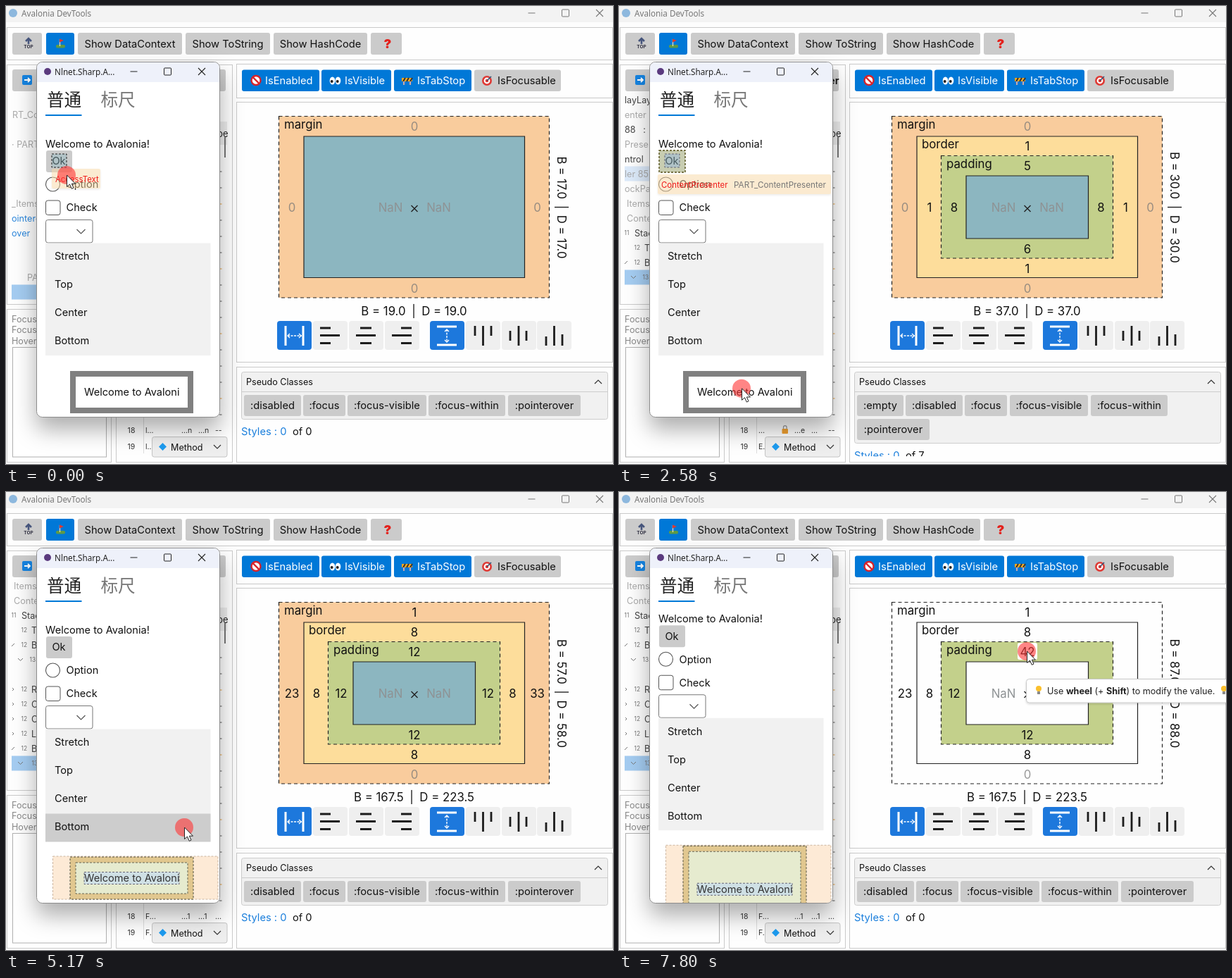
An HTML page for the animation above (8000 ms loop, 862 by 650 pixels).

```html
<!DOCTYPE html>
<html lang="en">
<head>
<meta charset="utf-8">
<title>DevTools layout inspector</title>
<style>
html, body { margin: 0; width: 100%; height: 100%; overflow: hidden; background: #fdfdfd; }
svg { display: block; font-family: Inter, "Noto Sans", sans-serif; }
.ui { font-family: "Noto Sans", sans-serif; }
.cjk { font-family: "Noto Sans CJK SC Light", "Noto Sans CJK SC", "Noto Sans CJK", sans-serif; font-weight: 300; }
</style>
</head>
<body>
<svg id="stage" width="862" height="650" viewBox="0 0 862 650"></svg>
<script>
const LOOP = 8000;
const BLUE = '#0078d7', GRAY = '#cbcbcb', INK = '#111';
const FILL = { margin: '#f9cc9d', border: '#fddd9b', padding: '#c3d08b', content: '#8cb6c0' };
const stage = document.getElementById('stage');

// ---------- drawing helpers: text is placed by its vertical middle ----------
const T = (x, y, s, size = 14.6, fill = INK, more = '') =>
  `<text x="${x}" y="${y + size * .364}" font-size="${size}" fill="${fill}" ${more}>${s}</text>`;
const MID = 'text-anchor="middle"';
const R = (x1, y1, x2, y2, fill, more = '') =>
  `<rect x="${x1}" y="${y1}" width="${x2 - x1}" height="${y2 - y1}" fill="${fill}" ${more}/>`;
const P = (d, stroke = INK, w = 1, more = '') =>
  `<path d="${d}" fill="none" stroke="${stroke}" stroke-width="${w}" ${more}/>`;
const C = (x, y, r, fill, more = '') => `<circle cx="${x}" cy="${y}" r="${r}" fill="${fill}" ${more}/>`;
const panel = (x1, y1, x2, y2) => R(x1 + .5, y1 + .5, x2 + .5, y2 + .5, '#fefefe', 'stroke="#cacaca"');
const button = (x1, y1, x2, y2, on) => R(x1, y1, x2, y2, on ? BLUE : GRAY, 'rx="3"');
const loopPath = ([a, b, c, d]) => `M${a} ${b}H${c}V${d}H${a}Z`;
const ring = (outer, inner, fill, more = '') =>
  `<path d="${loopPath(outer)}${inner ? loopPath(inner) : ''}" fill="${fill}" fill-rule="evenodd" ${more}/>`;
const inside = ([a, b, c, d], p) => p.x >= a && p.x <= c && p.y >= b && p.y <= d;
const bulb = (x, y) => C(x, y - 2, 4, '#fbc02d') + R(x - 2, y + 2, x + 2, y + 6, '#8a8a8a');

// ---------- static parts ----------
function windowButtons(xs, y, h, color) {
  const [a, b, c] = xs;
  return P(`M${a - h} ${y}h${2 * h}M${c - h} ${y - h}l${2 * h} ${2 * h}m0 ${-2 * h}l${-2 * h} ${2 * h}`, color, 1.1) +
    R(b - h, y - h, b + h, y + h, 'none', `stroke="${color}" rx="1"`);
}

function toolbar() {
  const labels = [[102, 250, 'Show DataContext'], [255, 375, 'Show ToString'], [380, 513, 'Show HashCode']];
  return panel(1, 30, 861, 76) +
    button(9, 38, 51, 69) + P('M32 54V48M28 50l4-4 4 4', '#46557c', 2.6) +
    T(32, 58, 'TOP', 6.5, '#334', `${MID} font-weight="700"`) +
    button(57, 38, 97, 69, true) + R(71, 55, 84, 59.5, '#5f9a45', 'rx="2"') +
    P('M76.500 47V57', '#e8dcc0', 1.3) + '<path d="M76 46.500l6 2.500-6 2.500Z" fill="#e5372c"/>' +
    labels.map(([a, b, s]) => button(a, 38, b, 69) + T((a + b) / 2, 53.5, s, 14.7, INK, MID)).join('') +
    button(518, 38, 562, 69) + T(542, 53.5, '?', 18, '#e3211c', `${MID} font-weight="900"`);
}

function flags() {
  const items = [[335, 445, 'IsEnabled'], [448, 547, 'IsVisible'], [551, 661, 'IsTabStop'], [665, 788, 'IsFocusable']];
  return panel(327, 82, 861, 130) +
    items.map(([a, b, s], i) => button(a, 90.5, b, 121, i < 3) + T(a + 33, 105.5, s, 14.7, i < 3 ? '#fff' : INK)).join('') +
    C(355, 105.5, 6.5, '#fff', 'stroke="#d8232a" stroke-width="2.4"') + P('M350.5 101l9 9', '#d8232a', 2.4) +
    [463.5, 471.5].map(x => `<ellipse cx="${x}" cy="106" rx="3.800" ry="5.500" fill="#fff"/>` + C(x - .8, 107, 2, '#222')).join('') +
    R(562, 102, 577, 107, '#f6a821') + P('M564 107l3-5M569 107l3-5M574 107l3-5', '#333', 2) + P('M565 107v5M574 107v5', '#caa', 2) +
    C(683, 106, 7, '#df3a35') + C(683, 106, 4.4, '#fff') + C(683, 106, 2.3, '#df3a35') + P('M683 106l6-6', '#357', 1.6);
}

function alignButtons() {
  const cells = [385, 436, 487, 538, 602, 653, 704, 754];
  const hLines = 'M446 457h15M446 467.5h28M446 478.5h15M503 457h16M497 467.5h28M503 478.5h16M561 457h15M548 467.5h28M561 478.5h15';
  const vLines = 'M666 454v14M677.500 454v28M689 454v14M716 461v14M728 454v28M739 461v14M767 469v13M778.500 454v28M790 466v16';
  return cells.map((x, i) => R(x, 447, x + 49, 488, i % 4 ? '#efefef' : '#1d78dc', 'rx="4"')).join('') +
    P(hLines + vLines, '#1c1c1c', 2.8) +
    P('M397 454v28M422 454v28M612 455h28M612 481h28', '#fff', 3) +
    P('M400 468h20M626 459v18', '#fff', 1.4, 'stroke-dasharray="3 1.500"') +
    P('M403 465l-3 3 3 3M416 465l3 3-3 3M623 462l3-3 3 3M623 474l3 3 3-3', '#fff', 1.3);
}

function leftPanels() {
  const ticks = Array.from({ length: 16 }, (_, i) => Math.round(234.5 + i * 23));
  return panel(1, 83, 149, 423) + button(9, 90, 60, 121) + R(23, 98, 37, 112, '#1583e0', 'rx="2"') +
    P('M26 105h8M31 102l3 3-3 3', '#fff', 1.8) +
    panel(1, 430, 149, 647) +
    ['Focus', 'Focus', 'Hover'].map((s, i) => T(8, 444 + i * 15.7, s, 12.6, '#888')).join('') +
    R(9.5, 484.5, 142.5, 640, '#fff', 'stroke="#b0b0b0"') +
    panel(156, 83, 321, 647) + button(240, 90, 312, 121) +
    R(156, 164, 314, 197, '#ececec') + T(300, 181, 'pe', 13, '#222') + P('M311 186v29', '#777', 2) +
    ticks.map((y, i) => P(`M303 ${y}h3.500`, i % 4 === 2 ? '#e8a03c' : '#555')).join('') +
    P('M195.500 583v52', '#ddd') +
    T(178, 602, '18', 10.5, '#333', MID) + T(178, 625, '19', 10.5, '#333', MID);
}

function backdrop() {
  return R(0, 0, 862, 650, '#fdfdfd') + R(0, 0, 862, 23, '#f3f3f3') +
    C(10, 10, 6, '#8db8de') + T(22, 10.5, 'Avalonia DevTools', 11.7, '#777', 'class="ui"') +
    windowButtons([746.5, 794.5, 843], 10, 5, '#777') + toolbar() + flags() + leftPanels() +
    panel(327, 136, 861, 505) + panel(327, 512, 861, 647) + alignButtons();
}

const shadow = (id, dy, blur, alpha) =>
  `<filter id="${id}" x="-40%" y="-40%" width="180%" height="180%"><feDropShadow dx="0" dy="${dy}" stdDeviation="${blur}" flood-opacity="${alpha}"/></filter>`;

stage.innerHTML = `<defs>
  <clipPath id="treeClip"><rect x="8" y="128" width="135" height="290"/></clipPath>
  <clipPath id="winClip"><rect x="44" y="80" width="259" height="503" rx="8"/></clipPath>
  <clipPath id="panelClip"><rect x="328" y="513" width="533" height="126"/></clipPath>
  ${shadow('winShadow', 17, 16, .32)}${shadow('tipShadow', 1.5, 1.8, .16)}
</defs>` + backdrop() + `<g id="tree" clip-path="url(#treeClip)"></g><g id="table"></g><g id="box"></g>
<g id="pseudo" clip-path="url(#panelClip)"></g>
<rect x="43.500" y="79.500" width="260" height="504" rx="8" fill="#fff" stroke="#8d8d8d" filter="url(#winShadow)"/>
<g id="win" clip-path="url(#winClip)"></g><g id="tip"></g><g id="cursor"></g>`;

// ---------- timeline ----------
const path = [[0, 86, 240], [1020, 86, 240], [1200, 82, 205], [1320, 80, 198], [1560, 86, 222], [1780, 93, 278],
  [1850, 93, 280], [2100, 110, 360], [2350, 150, 470], [2520, 174, 540], [2650, 174, 546], [2850, 173, 547],
  [4560, 173, 547], [4800, 205, 535], [4950, 235, 500], [5140, 253, 476], [5190, 253, 476], [5300, 249, 466],
  [5760, 249, 466], [5900, 305, 420], [6030, 410, 355], [6160, 477, 321], [6350, 480, 250], [6520, 520, 228], [6850, 579, 226]];
const clamp = v => Math.max(0, Math.min(1, v));
const ramp = (t, a, b) => clamp((t - a) / (b - a));
const smooth = v => v * v * (3 - 2 * v);

function pointer(t) {
  const i = path.findIndex(k => k[0] > t);
  if (i < 0) { const [, x, y] = path[path.length - 1]; return { x, y }; }
  const [a, x, y] = path[i - 1], [b, x2, y2] = path[i];
  const k = ramp(t, a, b);
  return { x: x + (x2 - x) * k, y: y + (y2 - y) * k };
}

const commonClasses = [[338, 419, ':disabled'], [422, 482, ':focus'], [485, 597, ':focus-visible'], [600, 709, ':focus-within'], [713, 816, ':pointerover']];
const emptyClasses = [[338, 404, ':empty'], [407, 488, ':disabled'], [491, 551, ':focus'], [555, 666, ':focus-visible'], [670, 779, ':focus-within'], [338, 441, ':pointerover']];
const plain = { margin: [0, 0, 0, 0], simple: true, classes: commonClasses, styles: 0 };
// thickness order: left, top, right, bottom
const selections = {
  access: { ...plain, w: ['19.0', '19.0'], h: ['17.0', '17.0'], cells: ['l...', '...n', '...n', '--', 'l..'], row: 13 },
  presenter: { margin: [0, 0, 0, 0], border: [1, 1, 1, 1], padding: [8, 5, 8, 6], w: ['37.0', '37.0'], h: ['30.0', '30.0'],
    classes: emptyClasses, styles: 7, cells: ['...', '...e', '...', '--', 'E.'], lock: true, row: 12 },
  text: { ...plain, w: ['127.5', '127.5'], h: ['17.0', '17.0'], cells: ['T...', '...k', '...k', '--', 'T.'], row: 20 },
  border: { margin: [23, 1, 33, 0], border: [8, 8, 8, 8], padding: [12, 12, 12, 12], w: ['167.5', '223.5'],
    classes: commonClasses, styles: 0, cells: ['F...', '...1', '...1', '...', 'F.'], row: 19 }
};
const selectionAt = t => t < 210 ? 'access' : t < 3050 ? 'presenter' : t < 3810 ? 'text' : 'border';

// ---------- element tree ----------
const treeRows = [['layLayer', 8], ['enter', 8, 1], ['88 &#160; :', 8], ['Presenter', 8, 1], ['ntrol', 8], ['ler 85', 8, 1], ['ockPanel', 8, 1],
  ['ItemsPresenter', 11, 1], ['ContentPresenter', 11, 1], ['StackPanel', 22, 0, 11], ['TextBlock', 36, 0, 12], ['Button 2', 36, 0, 12],
  ['ContentPresenter', 48, 1, 13], ['AccessText', 63, 0, 14], ['RadioButton', 36, 0, 12], ['CheckBox', 36, 0, 12], ['ComboBox', 36, 0, 12],
  ['ListBox', 36, 0, 12], ['Border 2', 36, 0, 12], ['Border', 51, 0, 13], ['TextBlock', 63, 0, 14]];
const treeNotes = [[1, 9, 'RT_Co'], [3, 8, '· PART'], [7, 8, '_Items'], [8, 8, 'ointerover', 1], [9, 8, 'over', 1], [12, 30, 'PART']];
const NOTE_SHIFT = 170;

function tree(t, name, p) {
  const scrolled = t >= 3050;
  const dx = scrolled ? 45 * (1 - smooth(ramp(t, 3810, 4230))) : NOTE_SHIFT * (1 - smooth(ramp(t, 210, 620)));
  const y = i => 133 + 21 * i - (scrolled ? 147 : 0);
  const overBox = inside([91, 500, 266, 583], p);
  const hover = overBox && name === 'presenter' ? 5 : overBox && name === 'border' ? 20 : -1;
  const band = (i, fill) => i < 0 ? '' : R(8, y(i) - 10.5, 143, y(i) + 10.5, fill);
  const row = ([s, x, dim, depth], i) => T(x, y(i), s, 12.6, dim ? '#aaa' : '#444', s === 'Border' ? 'font-weight="700"' : '') +
    (depth ? T(x - 14.5, y(i), depth, 8.4, '#777') : '') +
    (depth === 13 ? P(`M17 ${y(i) - 2}l3.500 3.500 3.500-3.500`, '#777') : '') +
    (i > 13 && i < 18 ? P(`M9 ${y(i) - 2}l2 2-2 2`, '#777') : i === 11 || i === 18 ? P(`M8 ${y(i) + 2}l4-4`, '#777') : '');
  return band(hover, '#dceafa') + band(selections[name].row, '#a4ccf1') + `<g transform="translate(${-dx.toFixed(1)} 0)">` +
    treeRows.map(row).join('') +
    (scrolled ? '' : treeNotes.map(([i, x, s, hot]) => T(x + NOTE_SHIFT, y(i), s, 12.6, hot ? '#2a86dc' : '#aaa')).join('')) + '</g>';
}

function table(s, name) {
  const [a, b, c, d, e] = s.cells;
  return T(198, 602, a, 10.5, '#333') + T(249, 602, b, 10.5, '#333') + T(273, 602, c, 10.5, '#333') + T(297, 602, d, 10.5, '#333') +
    T(198, 625, e, 10.5, '#333') +
    (s.lock ? R(231.5, 600, 240, 607, '#f0a030', 'rx="1"') + P('M233.500 600v-2a2.300 2.300 0 0 1 4.600 0v2', '#999', 1.3) : '') +
    (name === 'presenter' ? T(298, 105.5, 'er', 14.7, INK, 'font-weight="600"') : '') +
    R(207.5, 611.5, 314, 640, '#eee', 'stroke="#c4c4c4" rx="3"') + '<path d="M222.500 620l5.500 5.500-5.500 5.500-5.500-5.500Z" fill="#1d9bf0"/>' +
    T(234, 626, 'Method', 12.6) + P('M295 623l5 5 5-5', '#333', 1.2);
}

// ---------- box model ----------
const zones = { margin: [387.5, 156.5, 771.5, 414], border: [423, 185, 736.5, 385.5], padding: [457.5, 212.5, 701.5, 358], content: [493, 241, 666.5, 330] };
const valueBox = [566, 214, 594, 238];
const order = ['margin', 'border', 'padding', 'content'];

function zoneAt(p) { return [...order].reverse().find(z => inside(zones[z], p)); }

function pair(x, y, [a, b], more = '') {
  return T(x, y, `B = ${a}<tspan dx="8.500">|</tspan><tspan dx="8.500">D = ${b}</tspan>`, 16.8, INK, MID + ' ' + more);
}

function boxModel(s, top, p, zone) {
  const names = s.simple ? ['margin', 'content'] : order;
  const rect = n => s.simple && n === 'content' ? zones.border : zones[n];
  let out = '';
  names.forEach((n, i) => {
    const fill = zone && zone !== n ? 'none' : FILL[n];
    const dash = n === 'margin' || n === 'padding' ? 'stroke-dasharray="5 4"' : '';
    out += ring(rect(n), names[i + 1] && rect(names[i + 1]), fill) + P(loopPath(rect(n)), '#222', 1.2, dash);
  });
  if (zone && inside(valueBox, p)) out += R(...valueBox, '#fff', 'rx="3"');
  names.filter(n => n !== 'content').forEach(n => {
    const i = order.indexOf(n), [l, , r, b] = s[n];
    const u = n === 'padding' ? top : s[n][1];
    const value = (x, y, v) => T(x, y, v, 16.8, v ? INK : '#777', MID + (v ? '' : ' opacity=".75"'));
    out += T(395 + 35 * i, 168 + 28 * i, n, 16.8) + value(580, 171 + 28 * i, u) + value(580, 401 - 28.2 * i, b) +
      value(406 + 35 * i, 286, l) + value(754.5 - 35 * i, 286, r);
  });
  out += T(546, 286, 'NaN', 16.8, '#8e9294', MID) + T(614.5, 286, 'NaN', 16.8, '#8e9294', MID) + P('M575.500 283l9 9m0-9l-9 9', '#222', 1.4);
  const h = s.h || [`${45 + top}.0`, `${46 + top}.0`];
  return out + pair(579.5, 432.5, s.w) + pair(0, 0, h, 'transform="translate(789 286) rotate(90)"');
}

function pseudo(s, over) {
  const end = s.classes === emptyClasses ? 620 : 586;
  return R(334.5, 519.5, 854.5, end + .5, '#f1f1f1', 'stroke="#cdcdcd" rx="3"') + P('M335 547.500H854', '#cdcdcd') +
    T(341, 533.5, 'Pseudo Classes', 12.6) + P('M836 536l5-5 5 5', '#333', 1.2) +
    s.classes.map(([a, b, label], i) => {
      const y = i === 5 ? 586 : 552, on = over && label === ':pointerover';
      return button(a, y, b, y + 30, on) + T((a + b) / 2, y + 15, label, 14.7, on ? '#fff' : INK, MID);
    }).join('') +
    T(334, end + 17.5, 'Styles : 0', 14.7, '#1b7fdc') + T(407, end + 17.5, `of ${s.styles}`, 14.7);
}

// ---------- sample window ----------
const dashed = (r, color = '#555', w = 1) => P(loopPath(r), color, w, 'stroke-dasharray="3 2"');
const hint = (x, y, w, name, extra = '') =>
  R(x, y, x + w, y + 28, '#f8d7a3', 'opacity=".5" rx="2" filter="url(#tipShadow)"') +
  T(x + 5, y + 14.5, name, 11.4, '#f01818') + extra;

function okAdorner(name) {
  const text = [65, 210, 86, 229];
  if (name === 'access') return ring(text, 0, FILL.content, 'opacity=".4"') + dashed(text, '#222') + hint(65, 231, 69, 'AccessText');
  if (name !== 'presenter') return '';
  const pad = [57, 205, 94, 236];
  return ring(pad, text, FILL.padding, 'opacity=".4"') + ring(text, 0, FILL.content, 'opacity=".45"') +
    dashed(pad, '#55501a', 1.4) + dashed(text, '#667') +
    hint(55, 239, 246, 'ContentPresenter', T(163, 253.5, 'PART_ContentPresenter', 11.7, '#777'));
}

function textBox(name, extra, zone) {
  const y = 518 - extra / 2, bottom = 578 + extra / 2, mid = 548 + extra / 2;
  const border = [91, y, 266, bottom], pad = [99, y + 8, 258, bottom - 8], text = [111, mid - 8.5, 246, mid + 8.5];
  const outer = [66.5, y - 1, 301, bottom];
  const show = n => name === 'border' && (!zone || zone === n);
  let out = ring(border, pad, '#808080');
  if (show('margin')) out += ring(outer, border, FILL.margin, 'opacity=".42"') + dashed(outer, '#cbb59f');
  if (show('border')) out += ring(border, pad, '#e1c78f') + dashed(border, '#554');
  if (show('padding')) out += ring(pad, text, '#e6ebcf') + dashed(pad, '#665');
  if (show('content') || name === 'text') out += ring(text, 0, '#cfe0e5');
  if (name === 'text' || show('content') || show('padding')) out += dashed(text, '#667');
  out += `<svg x="111" y="${mid - 12}" width="135" height="24">` + T(0, 12, 'Welcome to Avalonia!', 14.6, zone || name !== 'border' ? INK : '#333') + '</svg>';
  return out + (name === 'text' ? hint(109, 558, 66, 'TextBlock') : '');
}

function sampleWindow(name, p, extra, zone) {
  const items = ['Stretch', 'Top', 'Center', 'Bottom'].map((s, i) => {
    const y = 336.5 + i * 40, hot = inside([56, y - extra / 2, 290, y + 40 - extra / 2], p);
    return (hot ? R(56, y, 290.5, y + 40, '#cdcdcd') : '') + T(69, y + 18.5, s);
  }).join('');
  return R(43, 79, 304, 108, '#eef1fa') + C(59, 93, 5, '#5a3a7e') + T(69, 93.5, 'Nlnet.Sharp.A...', 11.7, '#222', 'class="ui"') +
    windowButtons([181.5, 229.5, 278], 93, 5, '#222') +
    T(58, 133, '普通', 24.6, '#222', 'class="cjk"') + T(134.5, 133, '标尺', 24.6, '#777', 'class="cjk"') + R(56, 154, 107.5, 156, BLUE) +
    `<g transform="translate(0 ${-extra / 2})">` + T(56, 195.5, 'Welcome to Avalonia!') +
    R(57, 205, 94, 236, GRAY, 'rx="3"') + T(75, 220, 'Ok', 14.6, INK, MID) +
    C(66.5, 253, 10, '#fff', 'stroke="#555" stroke-width="1.1"') + T(85.5, 253, 'Option') +
    R(56.5, 276, 77, 296.5, '#fff', 'stroke="#555" rx="3"') + T(85.5, 286, 'Check') +
    R(56.5, 303.5, 123, 336, '#fff', 'stroke="#777" rx="3"') + P('M100.500 317l6 6 6-6', '#555', 1.2) +
    R(56, 336.5, 290.5, 496, '#f1f1f1') + items + '</g>' + okAdorner(name) + textBox(name, extra, zone);
}

function wheelTip() {
  return R(578.5, 265.5, 880, 299, '#fff', 'stroke="#c9c9c9" rx="4" filter="url(#tipShadow)"') + bulb(596, 281) + bulb(859, 281) +
    T(608, 282, 'Use <tspan font-weight="700">wheel</tspan> (+ <tspan font-weight="700">Shift</tspan>) to modify the value.', 12.6, '#222');
}

const cursorShape = C(0, 0, 13, '#f33', 'opacity=".6"') +
  '<path d="M.500 0V16.500L4.500 13 7.300 19.300 10 18 7.300 12.200H12.500Z" fill="#fff" stroke="#222"/>';

// ---------- frame update ----------
const shown = {};
function put(id, html) {
  if (shown[id] === html) return;
  shown[id] = html;
  document.getElementById(id).innerHTML = html;
}

function render(t) {
  const name = selectionAt(t), s = selections[name], p = pointer(t);
  const top = s.padding ? (name === 'border' ? 12 + Math.round(30 * ramp(t, 7400, 7800)) : s.padding[1]) : 0;
  const extra = name === 'border' ? (top - 12) * 1.05 : 0;
  const zone = name === 'border' ? zoneAt(p) : undefined;
  const over = name === 'presenter' ? inside([57, 205, 94, 236], p)
    : name !== 'access' && inside([91, 518, 266, 578], p);
  put('tree', tree(t, name, p));
  put('table', table(s, name));
  put('box', boxModel(s, top, p, zone));
  put('pseudo', pseudo(s, over));
  put('win', sampleWindow(name, p, extra, inside(valueBox, p) ? undefined : zone));
  put('tip', t >= 7060 ? wheelTip() : '');
  put('cursor', `<g transform="translate(${p.x.toFixed(1)} ${p.y.toFixed(1)})">${cursorShape}</g>`);
}

const start = performance.now();
function tick() {
  render((performance.now() - start) % LOOP);
  requestAnimationFrame(tick);
}
tick();
</script>
</body>
</html>
```
